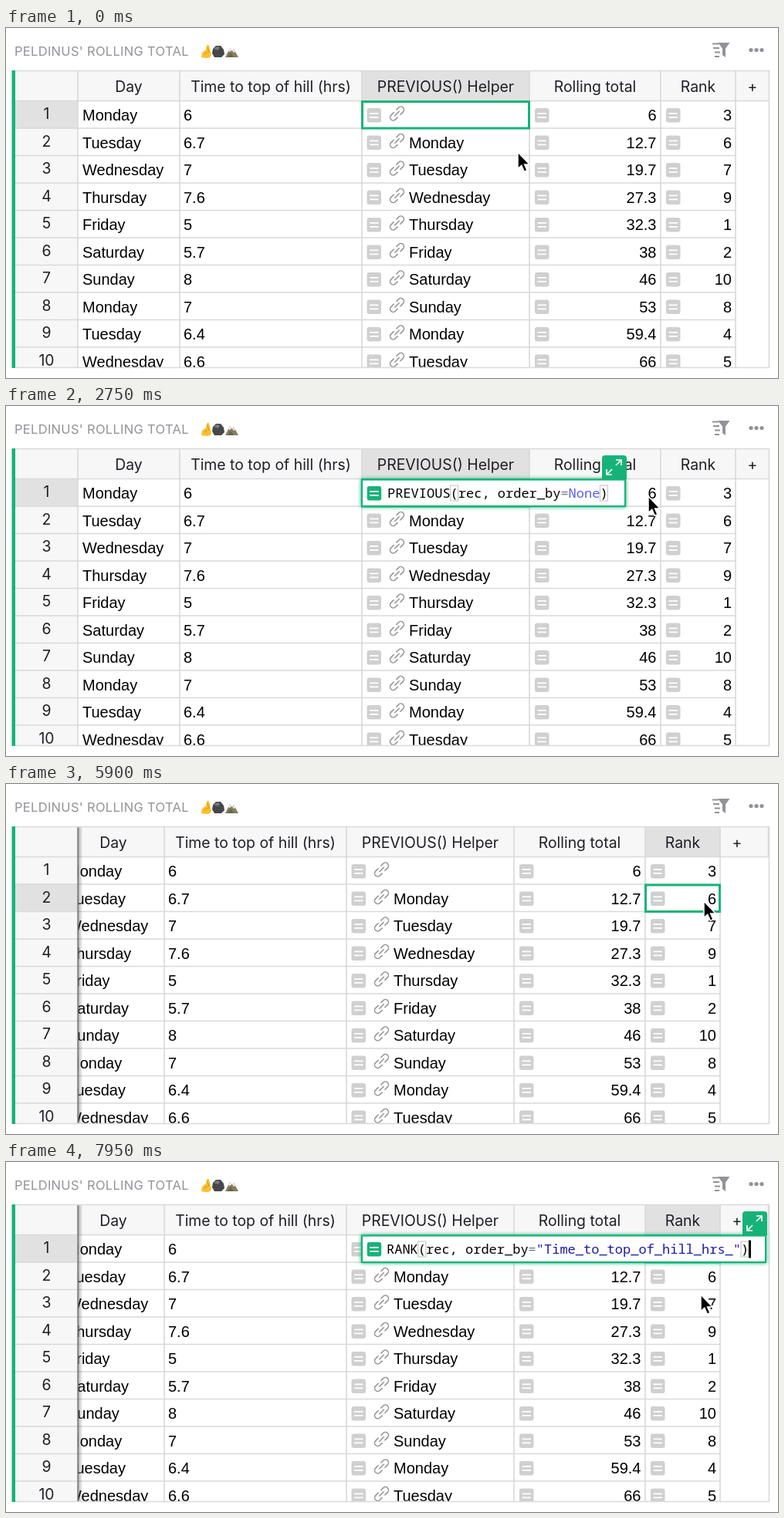
Recreate the animation shown at these times as an HTML page. Size 1000x454 px, loop 8 s.

```html
<!DOCTYPE html>
<html lang="en">
<head>
<meta charset="utf-8">
<title>Rolling total</title>
<style>
  html, body { margin: 0; width: 100%; height: 100%; overflow: hidden; background: #fff; }
  svg { display: block; width: 100vw; height: 100vh; }
  .ui { font: 19.4px Inter, sans-serif; fill: #1f1f26; text-anchor: middle; }
  .cell { font: 20px "Liberation Sans", sans-serif; fill: #000; }
  .num { text-anchor: end; }
  .code { font: 17px "Noto Sans Mono", monospace; fill: #000; }
  .title { font: 16.5px Inter, sans-serif; letter-spacing: .3px; fill: #929299; }
  .line { stroke: #d9d9d9; stroke-width: 1.6; }
  .link { fill: none; stroke: #929299; stroke-width: 1.5; }
  .glow { filter: drop-shadow(0 0 2.5px #16b378); }
</style>
</head>
<body>
<svg id="stage" viewBox="0 0 1000 454">
  <defs>
    <clipPath id="pane"><rect x="93" y="55" width="896" height="386"/></clipPath>
    <clipPath id="rows"><rect x="8" y="55" width="981" height="385.5"/></clipPath>
    <linearGradient id="shade">
      <stop offset="0" stop-color="#333" stop-opacity=".75"/>
      <stop offset=".35" stop-color="#444" stop-opacity=".3"/>
      <stop offset="1" stop-color="#444" stop-opacity="0"/>
    </linearGradient>
    <g id="eq">
      <rect width="18.5" height="18.5" rx="3"/>
      <path d="M3.5 6.9h11.5M3.5 11.8h11.5" stroke="#fff" stroke-width="1.8"/>
    </g>
    <g id="chain" class="link" transform="rotate(-45)">
      <path d="M-1.5 -4H-7a4 4 0 0 0 0 8h4.5M1.5 4H7a4 4 0 0 0 0 -8h-4.5M-4.5 0h9"/>
    </g>
  </defs>
  <rect width="1000" height="454" fill="#fff"/>

  <text class="title" x="11" y="36">PELDINUS' ROLLING TOTAL</text>
  <path d="M253 38l1-6 5-4 1-5q2-3 3 0l2 8 1 4q-1 4-6 4z" fill="#fbbf2d"/>
  <path d="M261 25l2 7M257 34l4-3" stroke="#d9901c" fill="none"/>
  <path d="M267 33l1-6 4-4 6 0 4 5 1 6-4 4h-9z" fill="#46474a"/>
  <path d="M269 27l4-3 4 1-2 4z" fill="#77797c"/>
  <path d="M284 38l6-12 3 4 2-3 6 11z" fill="#8a7a60"/>
  <path d="M288 30l2-4 2 3-2 2zM293.500 30l1.500-3 2 4-2 1z" fill="#e9eef0"/>
  <path d="M287 38l4-6 4 6z" fill="#5c6b45"/>

  <path d="M915 20.500h8M916 26h8M918 31.500h7M918 37h6" stroke="#929299" stroke-width="1.8"/>
  <path d="M922 19h15.500l-5.500 7.500v11.500l-4-3v-8.500z" fill="#929299"/>
  <g fill="#929299"><circle cx="965" cy="28.500" r="2.600"/><circle cx="972" cy="28.500" r="2.600"/><circle cx="979" cy="28.500" r="2.600"/></g>

  <g clip-path="url(#pane)"><g id="table"></g></g>
  <g id="labels" clip-path="url(#rows)"></g>
  <rect id="edge" x="92.500" y="55" width="7" height="386" fill="url(#shade)"/>
  <rect x="7.500" y="55" width="4.500" height="386" fill="#16b378"/>
  <path class="line" d="M12 55.500H989M12 440.500H989M988.500 55V441" fill="none"/>
  <g id="bars" fill="#000" fill-opacity=".27">
    <rect x="973.500" y="58" width="11.500" height="245" rx="5.700"/>
    <rect x="38" y="426" width="948" height="11.500" rx="5.700"/>
  </g>
  <g id="editors"></g>
  <path id="arrow" d="M0 0V21.500L4.800 17.200 8.300 25.300 12 23.700 8.600 15.900H15.200Z" fill="#000" stroke="#fff" stroke-width="1.500"/>
  <g id="beam" fill="none" stroke-linecap="round">
    <path d="M-5 -11.500Q0 -11.500 0 -8Q0 -11.500 5 -11.500M0 -8V8M-5 11.500Q0 11.500 0 8Q0 11.500 5 11.500M-3 4H3" stroke="#fff" stroke-width="4"/>
    <path d="M-5 -11.500Q0 -11.500 0 -8Q0 -11.500 5 -11.500M0 -8V8M-5 11.500Q0 11.500 0 8Q0 11.500 5 11.500M-3 4H3" stroke="#000" stroke-width="2"/>
  </g>
</svg>
<script>
const NS = 'http://www.w3.org/2000/svg';
const $ = id => document.getElementById(id);
const LOOP = 8000, STEP = 50, ROW = 35.5, TOP = 94.5;
const GREEN = '#16b378';

function add(parent, tag, attrs = {}, text) {
  const el = document.createElementNS(NS, tag);
  for (const k in attrs) el.setAttribute(k, attrs[k]);
  if (text !== undefined) el.textContent = text;
  return parent.appendChild(el);
}
const rect = (p, x, y, width, height, fill, more) =>
  add(p, 'rect', { x, y, width, height, fill, ...more });
const label = (p, cls, x, y, s) => add(p, 'text', { class: cls, x, y }, s);
const show = (el, on) => el.setAttribute('visibility', on ? 'visible' : 'hidden');
const move = (el, x, y) => el.setAttribute('transform', `translate(${x} ${y})`);

// Table
const edges = [93, 225, 461, 678, 848, 945];
const heads = ['Day', 'Time to top of hill (hrs)', 'PREVIOUS() Helper', 'Rolling total', 'Rank'];
const week = ['Monday', 'Tuesday', 'Wednesday', 'Thursday', 'Friday', 'Saturday', 'Sunday'];
const hours = [6, 6.7, 7, 7.6, 5, 5.7, 8, 7, 6.4, 6.6];
const ranks = [3, 6, 7, 9, 1, 2, 10, 8, 4, 5];

const table = $('table'), labels = $('labels');
rect(table, 93, 55, 916, 39, '#f7f7f7');
const headMark = rect(table, 0, 55, 10, 39, '#e1e1e1');
rect(labels, 12, 55, 81, 386, '#f7f7f7');
const rowMark = rect(labels, 12, TOP, 81, ROW, '#e1e1e1');

heads.forEach((h, i) => label(table, 'ui', (edges[i] + edges[i + 1]) / 2, 82.5, h));
label(table, 'ui', 967, 82.5, '+');
add(table, 'path', { class: 'line', d: 'M93 94.500H1009' });
add(labels, 'path', { class: 'line', d: 'M12 94.500H93M93 55V441' });
edges.slice(1).forEach(x => add(table, 'path', { class: 'line', d: `M${x} 55V441` }));
add(table, 'path', { class: 'line', d: 'M1007.500 55V94' });

let total = 0;
hours.forEach((h, i) => {
  const y = i * ROW, base = 120 + y;
  total += h;
  if (i < 9) {
    const ly = TOP + y + ROW;
    add(table, 'path', { class: 'line', d: `M93 ${ly}H945` });
    add(labels, 'path', { class: 'line', d: `M12 ${ly}H93` });
  }
  label(labels, 'ui', 52.5, 118.3 + y, i + 1);
  label(table, 'cell', 99, base, week[i % 7]);
  label(table, 'cell', 230, base, h);
  [467.5, 685, 855].forEach(x =>
    add(table, 'use', { href: '#eq', x, y: 104 + y, fill: '#d0d0d0' }));
  add(table, 'use', { href: '#chain', x: 506.5, y: 111 + y });
  if (i) label(table, 'cell', 522, base, week[(i - 1) % 7]);
  label(table, 'cell num', 842.5, base, +total.toFixed(1));
  label(table, 'cell num', 940, base, ranks[i]);
});
const box = rect(table, 0, 0, 10, ROW - 1, 'none', { stroke: GREEN, 'stroke-width': 3 });

// Formula editors: code pieces are [text, colour]
const OP = '#687687';
const editors = [
  { from: 1050, to: 2850, x: 460, right: 803, tx: 494, caret: 779.5, match: [8, 27],
    code: [['PREVIOUS(rec, order_by'], ['=', OP], ['None', '#585cf6'], [')']] },
  { from: 3100, to: 5600, x: 336, right: 985, tx: 371, caret: 961.5, match: [],
    code: [['$PREVIOUS_Helper.'], ['Rolling_total', '#3c4c72'], [' + ', OP], ['$Time_to_top_of_hill_hrs_']] },
  { from: 6900, to: LOOP, x: 460, right: 985, tx: 493, caret: 962, match: [4, 45],
    code: [['RANK(rec, order_by'], ['=', OP], ['"Time_to_top_of_hill_hrs_"', '#1a1aa6'], [')']] }
];
for (const e of editors) {
  const g = e.el = add($('editors'), 'g');
  const bx = e.right - 31;
  add(g, 'path', { d: `M${bx} 95V68q0-4 4-4h24q4 0 4 4V95z`, fill: GREEN });
  add(g, 'path', { fill: 'none', stroke: '#fff', 'stroke-width': 1.7,
    d: `M${bx + 18} 77l7-7m-7 0h7v7M${bx + 13} 82l-7 7m0-7v7h7` });
  rect(g, e.x + 1, 95.5, e.right - e.x - 2, 34.5, '#fff',
    { stroke: GREEN, 'stroke-width': 2.2, class: 'glow' });
  add(g, 'use', { href: '#eq', x: e.x + 7.7, y: 104, fill: GREEN });
  e.match.forEach(i => rect(g, e.tx + i * 10.2, 103, 10, 20, 'none', { stroke: '#c0c0c0' }));
  const t = label(g, 'code', e.tx, 119, '');
  t.setAttribute('xml:space', 'preserve');
  t.style.whiteSpace = 'pre';
  e.code.forEach(([s, fill = '#000']) => add(t, 'tspan', { fill }, s));
  e.mark = rect(g, e.caret, 101.5, 3, 23, '#000');
}

// Selection: [start, column, row, scroll]
const picks = [[0, 2, 0, 0], [2850, 3, 0, 0], [5600, 4, 1, 20], [6500, 4, 0, 20]];

// Pointer: [time, x, y]
const track = [
  [0, 663, 161], [50, 663, 161], [700, 625, 116], [2050, 625, 116],
  [2400, 722, 163], [2750, 832, 117], [2850, 833, 116], [3400, 833, 116],
  [3550, 814.5, 157], [3700, 783, 167], [3950, 757, 168], [5300, 757, 168],
  [5600, 904, 152], [6150, 904, 152], [6600, 899, 116], [7700, 899, 116],
  [7950, 900, 172], [LOOP, 900, 172]
];
function slope(i, k) {
  const a = track[i - 1], b = track[i], c = track[i + 1];
  const still = (p, q) => p[1] === q[1] && p[2] === q[2];
  if (!a || !c || still(a, b) || still(b, c)) return 0;
  return (c[k] - a[k]) / (c[0] - a[0]);
}
function pointer(t) {
  let i = track.findIndex(p => p[0] > t) - 1;
  if (i < 0) i = track.length - 2;
  const a = track[i], b = track[i + 1], d = b[0] - a[0], u = (t - a[0]) / d;
  const s = u * u * (3 - 2 * u);
  return [1, 2].map(k => a[k] + (b[k] - a[k]) * s
    + d * u * (1 - u) * (slope(i, k) * (1 - u) - slope(i + 1, k) * u));
}

function draw(t) {
  const [, col, row, scroll] = picks.filter(p => p[0] <= t).pop();
  const x = edges[col], w = edges[col + 1] - x;
  move(table, -scroll, 0);
  show($('edge'), scroll > 0);
  headMark.setAttribute('x', x);
  headMark.setAttribute('width', w);
  rowMark.setAttribute('y', TOP + row * ROW);
  box.setAttribute('x', x + 0.5);
  box.setAttribute('y', TOP + 1 + row * ROW);
  box.setAttribute('width', w - 1);

  const [px, py] = pointer(t);
  let typing = false;
  for (const e of editors) {
    const open = t >= e.from && t < e.to;
    show(e.el, open);
    show(e.mark, open && Math.floor((t - e.from) / 500) % 2 === 0);
    if (open && px > e.x && px < e.right && py > 94 && py < 131) typing = true;
  }
  const fade = t < 6900 ? 0 : Math.min(1, Math.max(0, (7650 - t) / 250));
  $('bars').setAttribute('opacity', fade);
  show($('arrow'), !typing);
  show($('beam'), typing);
  move($('arrow'), px, py);
  move($('beam'), px, py);
}

const start = performance.now();
function tick(now) {
  const t = Math.max(0, now - start) % LOOP;
  draw(Math.floor(t / STEP) * STEP);
  requestAnimationFrame(tick);
}
draw(0);
requestAnimationFrame(tick);
</script>
</body>
</html>
```
